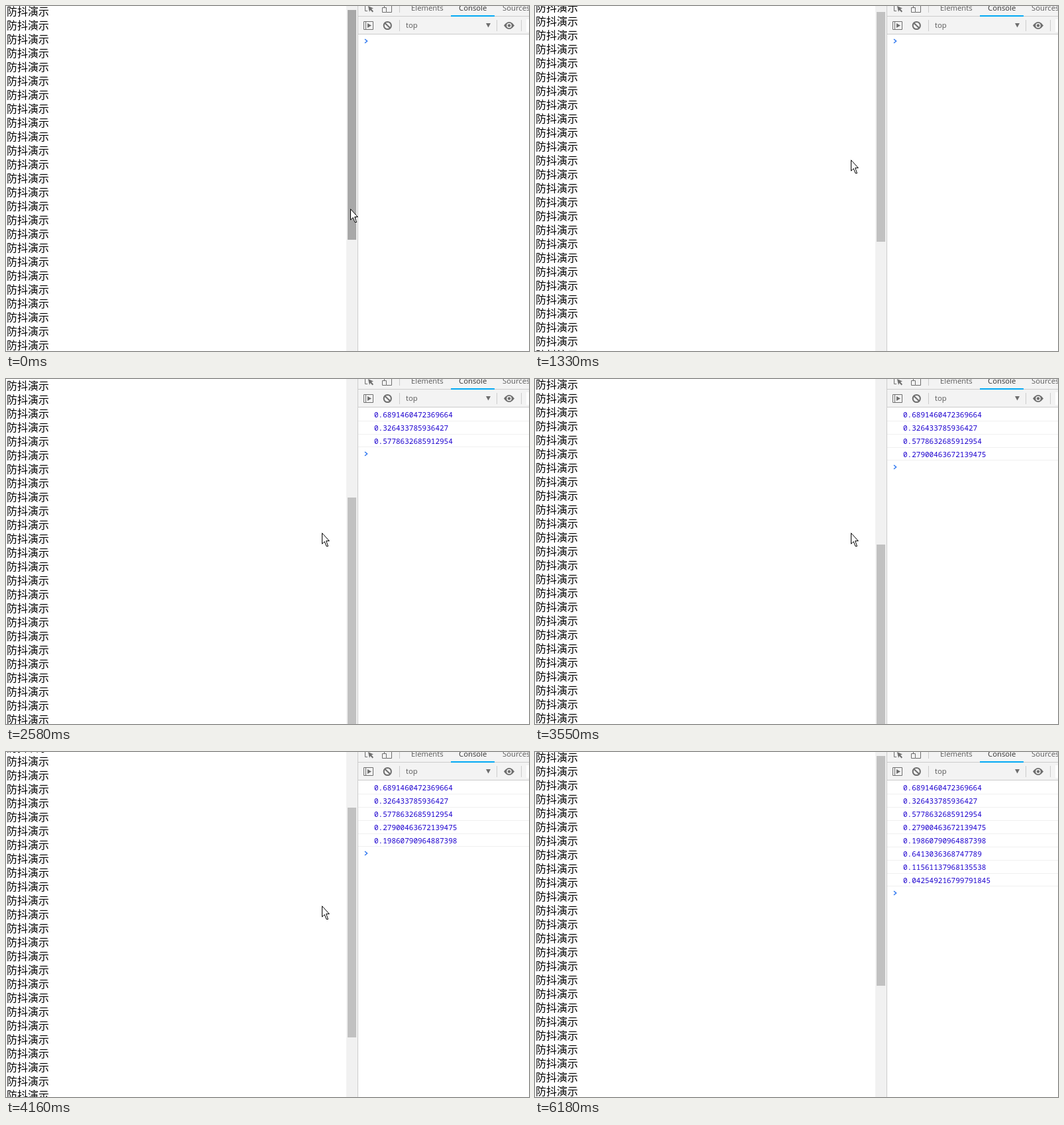
Write an HTML page that moves like this. It is 790 by 521 pixels and loops after 6640 ms.

```html
<!DOCTYPE html>
<html lang="zh-CN">
<head>
<meta charset="utf-8">
<title>防抖演示</title>
<style>
  html, body { margin: 0; width: 100%; height: 100%; overflow: hidden; background: #fff; }
  #stage { position: relative; width: 790px; height: 521px; overflow: hidden; background: #fff; }
  #stage > *, #console > * { position: absolute; }
  #rows {
    left: 1px; top: -3px; white-space: pre; color: #000;
    font: 16px/21px "Noto Sans CJK SC", "Noto Sans CJK", sans-serif;
  }
  #bar { left: 514px; top: 0; width: 17px; height: 521px; background: #f1f1f1; }
  #thumb { left: 516px; top: 0; width: 13px; height: 347px; }
  #console { left: 531px; top: 0; width: 258px; height: 521px; border-left: 1px solid #ccc; background: #fff; }
  .tools { left: 0; width: 258px; background: #f3f3f3; border-bottom: 1px solid #ccc; }
  #console .label { font: 11.3px/16px "Open Sans", "Noto Sans", sans-serif; color: #5a5a5a; }
  .log {
    left: 0; width: 258px; height: 19px; padding-left: 24px; box-sizing: border-box;
    font: 11px/19px "Noto Sans Mono", "DejaVu Sans Mono", monospace; color: #1c00cf;
  }
  .rule { left: 0; width: 258px; height: 1px; background: #f0f0f0; }
  svg { left: 0; top: 0; overflow: visible; }
</style>
</head>
<body>
<div id="stage">
  <div id="rows"></div>
  <div id="bar"></div>
  <div id="thumb"></div>
  <div id="console">
    <div class="tools" style="top:0;height:15px"></div>
    <div class="tools" style="top:16px;height:26px"></div>
    <div style="left:140px;top:14px;width:66px;height:2px;background:#03a9f4"></div>
    <div style="left:254px;top:20px;width:4px;height:19px;background:#fff"></div>
    <div class="label" style="left:80px;top:-5px">Elements</div>
    <div class="label" style="left:152px;top:-5px;color:#333">Console</div>
    <div class="label" style="left:218px;top:-5px">Sources</div>
    <div class="label" style="left:72px;top:21px">top</div>
  </div>
  <svg width="790" height="521" fill="none" stroke="#6e6e6e">
    <g stroke="#ccc">
      <path d="M594.5 0V10M594.5 21V38M741.5 21V38M778.5 21V38"/>
    </g>
    <!-- inspect and device icons -->
    <path d="M542.5 0V7.5H546"/>
    <path d="M547 0L555 3.5 552 4.6 555 8 553.6 9.4 550.4 6 549 9Z" fill="#6e6e6e" stroke="none"/>
    <path d="M571.5 0V2M575 9.5H582.5V0M568.5 2.5H574.5V9.5H568.5Z"/>
    <!-- sidebar, clear, context arrow, eye -->
    <path d="M540.5 23.5H554.5V35.5H540.5ZM543.5 23.5V35.5"/>
    <path d="M546 26V33L552 29.5Z" fill="#6e6e6e" stroke="none"/>
    <path d="M572 25.5L580.5 33.5" stroke-width="2"/>
    <circle cx="576.3" cy="29.5" r="5.6" stroke-width="2"/>
    <path d="M725 26H732L728.5 32.5Z" fill="#6e6e6e" stroke="none"/>
    <path d="M752 29.5Q760 18.500 768 29.500Q760 40.500 752 29.500Z" fill="#6e6e6e" stroke="none"/>
    <circle cx="760" cy="29.500" r="3" fill="#6e6e6e" stroke="#f3f3f3" stroke-width="1.500"/>
    <path id="prompt" d="M542 -3L545.500 0L542 3" stroke="#367cf1" stroke-width="1.600"/>
    <path id="cursor" d="M.5 .7V17L4.200 13.500L7 20.500H9.500L6.700 12.500H11.300Z" fill="#fff" stroke="#000"/>
  </svg>
</div>
<script>
  const LOOP = 6640;
  const $ = id => document.getElementById(id);

  // Console output: [time, value]
  const logs = [
    [1376, "0.6891460472369664"],
    [2300, "0.326433785936427"],
    [2580, "0.5778632685912954"],
    [3550, "0.27900463672139475"],
    [3860, "0.19860790964887398"],
    [4850, "0.6413036368747789"],
    [5220, "0.11561137968135538"],
    [6180, "0.042549216799791845"]
  ];

  // Bursts of screen updates: [first, last, count]
  const bursts = [
    [110, 260, 5], [490, 1000, 12], [1330, 1560, 6], [2580, 2810, 6],
    [3860, 4160, 7], [4650, 4700, 2], [5180, 5440, 7], [5590, 5820, 6]
  ];

  const scrollKeys = [
    [1305, 0], [1560, 300], [2518, 300], [2807, 441],
    [3830, 441], [4160, 141], [5129, 141], [5420, 0]
  ];

  const cursorKeys = [
    [75, 520, 306], [260, 513, 302], [450, 513, 302], [640, 498, 270],
    [790, 470, 222], [860, 465, 214], [920, 469, 218], [1000, 477, 232],
    [4610, 477, 232], [4700, 482, 230], [5545, 482, 230],
    [5774, 755, 504], [5820, 810, 560]
  ];

  const linear = p => p;
  const easeInOut = p => p < .5 ? 2 * p * p : 1 - 2 * (1 - p) ** 2;

  function track(keys, t, ease) {
    const i = keys.findIndex(k => k[0] > t);
    if (i < 0) return keys[keys.length - 1].slice(1);
    if (i === 0) return keys[0].slice(1);
    const [a, ...from] = keys[i - 1], [b, ...to] = keys[i];
    const p = ease((t - a) / (b - a));
    return from.map((v, j) => Math.round(v + (to[j] - v) * p));
  }

  // Time of the latest screen update
  function snap(t) {
    let time = 0;
    for (const [a, b, n] of bursts) {
      if (t < a) break;
      const gap = (b - a) / (n - 1);
      time = a + gap * Math.min(n - 1, Math.floor((t - a) / gap + .2));
    }
    return time;
  }

  function addLine(className, top, text = "") {
    const el = document.createElement("div");
    el.className = className;
    el.style.top = top + "px";
    el.textContent = text;
    $("console").append(el);
    return el;
  }

  $("rows").textContent = "防抖演示\n".repeat(50);
  const lines = logs.map(([time, text], i) => ({
    time,
    log: addLine("log", 44 + 20 * i, text),
    rule: addLine("rule", 63 + 20 * i)
  }));

  function draw(t) {
    const time = snap(t);
    const [scroll] = track(scrollKeys, time, easeInOut);
    const [x, y] = track(cursorKeys, time, linear);

    $("rows").style.transform = `translateY(${-scroll}px)`;
    $("thumb").style.transform = `translateY(${Math.round(6 + scroll / 1.807)}px)`;
    $("thumb").style.background = time < 400 && x > 514 ? "#a8a8a8" : "#c1c1c1";
    $("cursor").setAttribute("transform", `translate(${x} ${y})`);

    const count = logs.filter(([at]) => t >= at).length;
    lines.forEach(({ log, rule }, i) => {
      log.style.visibility = rule.style.visibility = i < count ? "visible" : "hidden";
      rule.style.top = 63 + 20 * i - (i === count - 1) + "px";
    });
    $("prompt").setAttribute("transform", `translate(0 ${53 + 20 * count})`);
  }

  const start = performance.now();
  function tick() {
    draw((performance.now() - start) % LOOP);
    requestAnimationFrame(tick);
  }
  tick();
</script>
</body>
</html>
```
